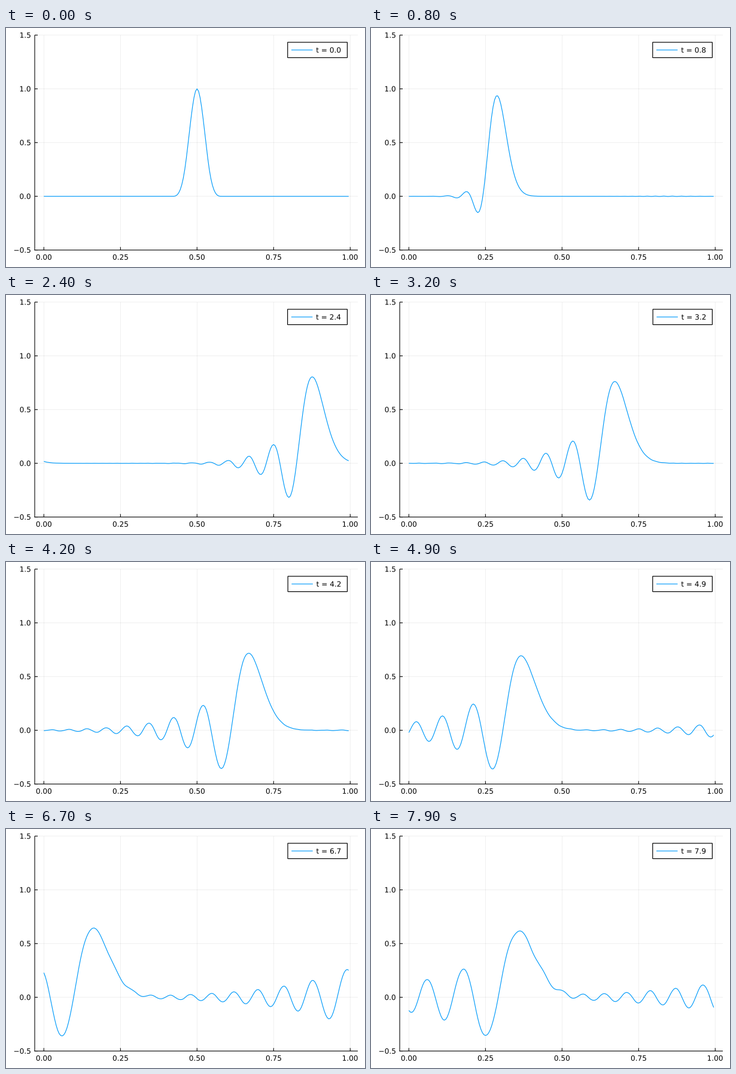
Write a matplotlib script that moves like this. It is 600 px wide and 400 px high and loops after 8000 ms.

```python
import numpy as np
import matplotlib.pyplot as plt
from matplotlib.animation import FuncAnimation
from matplotlib.patches import PathPatch, Rectangle
from matplotlib.path import Path
from matplotlib.textpath import TextPath

plt.rcParams["font.family"] = "DejaVu Sans"

W, H, DPI = 600, 400, 100
FRAMES, STEP_MS = 80, 100
N = 200
BLUE = "#009AFA"
FONT_PX = 12.1
LEFT, RIGHT, TOP, BOTTOM = 48, 588, 11.9, 371.6


def lw(px):
    return px * 72 / DPI


def px_x(x):
    return LEFT + 540 * 0.03 / 1.06 + x * 540 / 1.06 / (1 - 1 / N)


def px_y(y):
    return BOTTOM - (y + 0.5) * (BOTTOM - TOP) / 2


# Cubic spline pulse, advected with central differences on a periodic grid
x = np.arange(N) / N
s = 25 * np.abs(x - 0.5)
pulse = np.where(s < 1, 1 - 1.5 * s**2 + 0.75 * s**3,
                 0.25 * np.clip(2 - s, 0, None)**3)
spectrum = np.fft.fft(pulse)
omega = N * np.sin(2 * np.pi * np.arange(N) / N)


def solution(t):
    return np.fft.ifft(spectrum * np.exp(-1j * omega * t)).real


fig = plt.figure(figsize=(W / DPI, H / DPI), dpi=DPI, facecolor="white")
ax = fig.add_axes([0, 0, 1, 1])
ax.set_axis_off()


def segment(x0, y0, x1, y1, width=1.1, color="black", **kw):
    return ax.plot([x0, x1], [y0, y1], color=color, lw=lw(width),
                   solid_capstyle="butt", snap=False, **kw)[0]


def glyphs(text, px, py, align=0.0):
    """Outline of text on baseline py; align 0 left, 0.5 centre, 1 right."""
    tp = TextPath((0, 0), text, size=FONT_PX)
    box = tp.get_extents()
    shift = px - box.x0 - align * box.width
    return Path(tp.vertices * [1, -1] + [shift, py], tp.codes), box.width


def label(path, z=2):
    patch = PathPatch(path, fc="black", lw=0, zorder=z, snap=False)
    ax.add_patch(patch)
    return patch


for v in (0, 0.25, 0.5, 0.75, 1):
    p = px_x(v)
    segment(p, TOP, p, BOTTOM, 0.8, alpha=0.08, zorder=1)
    segment(p, BOTTOM, p, BOTTOM - 5, zorder=2)
    label(glyphs(f"{v:.2f}", p, 387.8, 0.5)[0])

for v in (-0.5, 0, 0.5, 1, 1.5):
    p = px_y(v)
    segment(LEFT, p, RIGHT, p, 0.8, alpha=0.08, zorder=1)
    segment(LEFT, p, LEFT + 5, p, zorder=2)
    label(glyphs(f"{v:.1f}".replace("-", "\u2212"), 40.8, p + 4.4, 1)[0])

segment(LEFT, TOP, LEFT, BOTTOM + 0.5, zorder=2)
segment(LEFT - 0.5, BOTTOM, RIGHT, BOTTOM, zorder=2)

curve, = ax.plot(px_x(x), px_y(pulse), color=BLUE, lw=lw(1.15), zorder=3,
                 solid_capstyle="butt", solid_joinstyle="round")

# Legend: right edge fixed, left edge follows the width of the text
BOX_RIGHT, TEXT_RIGHT = 570.4, 559.2
frame = Rectangle((470.4, 23.9), 100, 25.7, fc="white", ec="black",
                  lw=lw(1.2), zorder=4, snap=False)
ax.add_patch(frame)
key = segment(476.6, 36.8, 512, 36.8, 1.15, BLUE, zorder=5)
caption = label(glyphs("t = 0.0", TEXT_RIGHT, 41.2, 1)[0], 5)

ax.set_xlim(0, W)
ax.set_ylim(H, 0)


def draw(i):
    t = i / 10
    curve.set_ydata(px_y(solution(t)))
    path, width = glyphs(f"t = {t:.1f}", TEXT_RIGHT, 41.2, 1)
    caption.set_path(path)
    start = TEXT_RIGHT - width
    frame.set_x(start - 47.8)
    frame.set_width(BOX_RIGHT - start + 47.8)
    key.set_xdata([start - 41.6, start - 6.1])
    return curve, caption, frame, key


anim = FuncAnimation(fig, draw, frames=FRAMES, interval=STEP_MS,
                     init_func=lambda: draw(0), repeat=True, repeat_delay=0)
plt.show()
```
